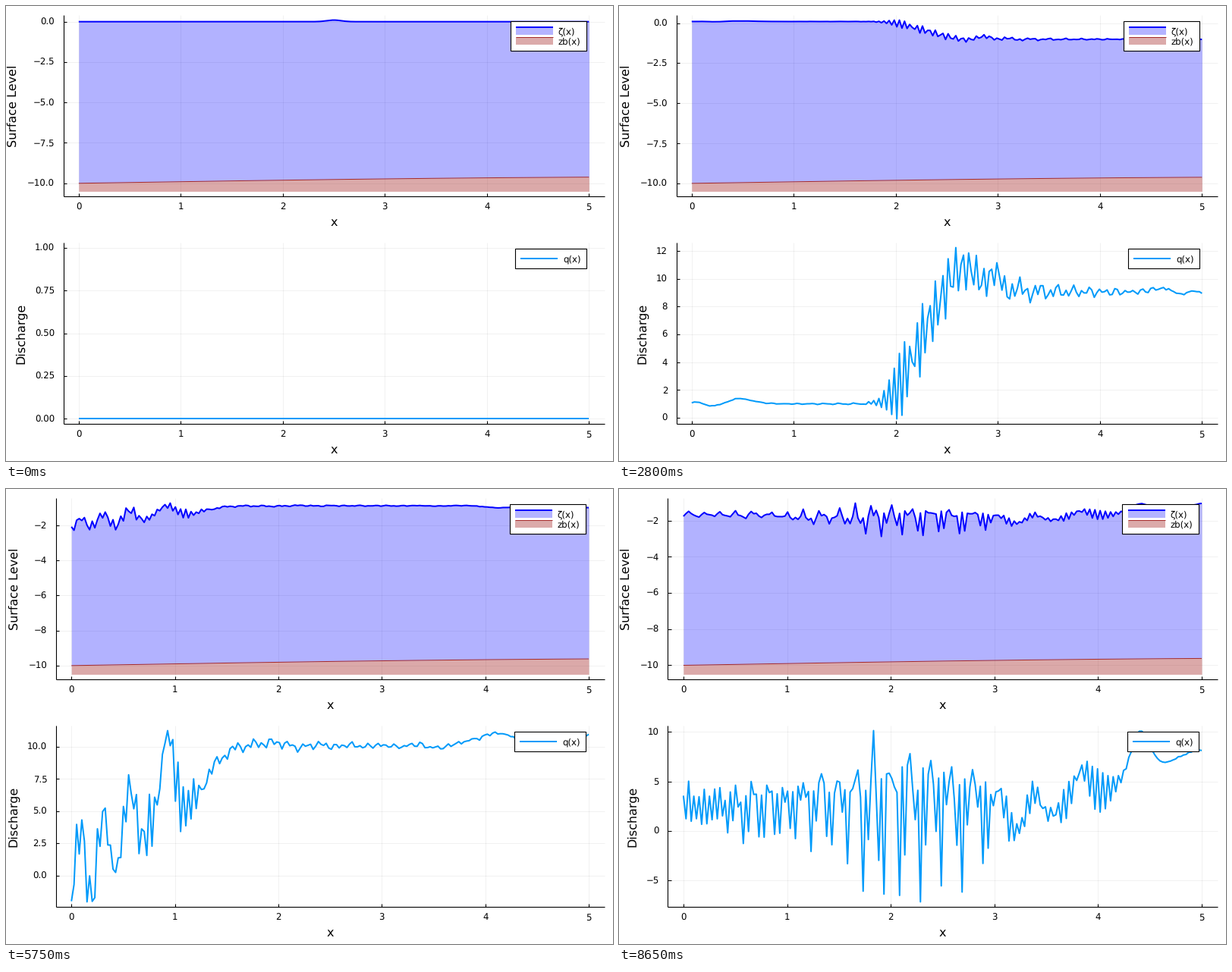
Recreate the animation shown at these times as a matplotlib script. Size 800 by 600 pixels, loop 8.7 s.

```python
import numpy as np
import matplotlib.pyplot as plt
from matplotlib.animation import FuncAnimation
from matplotlib.collections import LineCollection
from matplotlib.patches import Rectangle

plt.rcParams["font.family"] = "DejaVu Sans"
plt.rcParams["text.hinting"] = "none"

FRAMES, SUBSTEPS = 174, 6
N, LENGTH, G, CF = 200, 5.0, 9.81, 0.0025
Q_IN, Z_OUT, LAG = 1.0, -1.0, 0.0018
X = np.linspace(0, LENGTH, N)
DX = X[1] - X[0]
BED = -10 + 0.4 * np.sin(X / 4)
FLOOR = -10.5

BLUE, BROWN, SKY = "#0000ff", "#a52a2a", "#009afa"
BLUE_FILL, BROWN_FILL = "#b3b3ff", "#dbaaaa"
RIGHT = 788.5
TOPS, HEIGHT = (11.8, 311.8), 239.4
TICK_PX, LABEL_PX = 11.8, 16


# --- shallow water flow on a collocated grid ---------------------------

def ddx(a, left, right):
    p = np.concatenate(([left], a, [right]))
    return (p[2:] - p[:-2]) / (2 * DX)


def rates(z, q, q_out):
    h = z - BED
    dz = -ddx(q, Q_IN, q_out)
    flux = ddx(q * q / h, Q_IN ** 2 / h[0], q_out ** 2 / (Z_OUT - BED[-1]))
    dq = -flux - G * h * ddx(z, z[0], Z_OUT) - CF * q * np.abs(q) / h ** 2
    return np.array([dz, dq])


def damp(a, scale):
    """Weak filter that only bites on very large grid-scale wiggles."""
    d = np.zeros(N)
    d[2:-2] = (a[:-4] - 4 * a[1:-3] + 6 * a[2:-2] - 4 * a[3:-1] + a[4:]) / 16
    return a - d * np.minimum(0.25, 1e-4 + 6e-6 * (d * scale) ** 4)


def clock(i):
    """Model time: even steps that lengthen towards the end."""
    return 0.00559 * i + 1.68e-5 * max(0, i - 130) ** 2


def simulate():
    s = np.array([0.1 * np.exp(-100 * (X - 2.5) ** 2), np.zeros(N)])
    q_out = 0.0
    states = [s.copy()]
    for i in range(1, FRAMES):
        dt = (clock(i) - clock(i - 1)) / SUBSTEPS
        for _ in range(SUBSTEPS):
            k1 = rates(*s, q_out)
            k2 = rates(*(s + dt / 2 * k1), q_out)
            k3 = rates(*(s + dt / 2 * k2), q_out)
            k4 = rates(*(s + dt * k3), q_out)
            s = s + dt / 6 * (k1 + 2 * k2 + 2 * k3 + k4)
            s = np.array([np.clip(damp(s[0], 10), -3.2, 0.25),
                          np.clip(damp(s[1], 1), -9, 12.5)])
            q_out += (s[1][-1] - q_out) * dt / LAG
        states.append(s.copy())
    return states


STATES = simulate()


# --- axis helpers -------------------------------------------------------

def padded(lo, hi):
    if hi - lo < 1e-9:
        lo, hi = 0.0, 1.0
    pad = 0.03 * (hi - lo)
    return lo - pad, hi + pad


def ticks(lo, hi):
    """Pick 4 to 8 round tick values and return them with their labels."""
    best = None
    for e in range(-3, 2):
        for m, nice in ((1, 1), (5, 0.9), (2, 0.7), (2.5, 0.5), (3, 0.2)):
            step = m * 10.0 ** e
            a, b = int(np.ceil(lo / step)), int(np.floor(hi / step))
            n = b - a + 1
            if not 4 <= n <= 8:
                continue
            score = (0.25 * (1 - abs(n - 5) / 5) + 0.25 * nice
                     + 0.5 * (hi - lo) / ((n - 1) * step)
                     + (a <= 0 <= b) / 6)
            key = (round(score, 6), -n)
            if best is None or key > best[0]:
                best = key, step, a, b
    _, step, a, b = best
    digits = next(d for d in range(5) if abs(round(step, d) - step) < 1e-9)
    values = [k * step for k in range(a, b + 1)]
    return values, [f"{v:.{digits}f}".replace("-", "\u2212") for v in values]


def text_width(label):
    em = {"\u2212": 0.838, ".": 0.318}
    return TICK_PX * sum(em.get(c, 0.636) for c in label)


# --- drawing in pixel coordinates ----------------------------------------

fig = plt.figure(figsize=(8, 6), dpi=100, facecolor="white")
ax = fig.add_axes([0, 0, 1, 1])


def text(x, y, s, px=TICK_PX, ha="left", rotation=0):
    ax.text(x, y, s, fontsize=px * 0.72, ha=ha, va="baseline", color="black",
            rotation=rotation, rotation_mode="anchor", zorder=6)


def line(x, y, color, px, z=4):
    ax.plot(x, y, color=color, lw=px * 0.72, zorder=z,
            solid_capstyle="butt", solid_joinstyle="round")


def segments(segs, px, z, **kw):
    ax.add_collection(LineCollection(segs, linewidths=px * 0.72, zorder=z, **kw))


def box(x0, y0, x1, y1, fill, edge="none", z=5):
    ax.add_patch(Rectangle((x0, y0), x1 - x0, y1 - y0, facecolor=fill,
                           edgecolor=edge, lw=0.8, zorder=z))


def draw_axes(top, left, px, py, values, labels, title):
    bottom = top + HEIGHT
    xs, ys = [px(k) for k in range(6)], [py(v) for v in values]
    segments([[(x, top), (x, bottom)] for x in xs]
             + [[(left, y), (RIGHT, y)] for y in ys], 0.8, 1,
             colors="black", alpha=0.07)
    segments([[(left, top), (left, bottom)], [(left, bottom), (RIGHT, bottom)]]
             + [[(x, bottom), (x, bottom - 4.5)] for x in xs]
             + [[(left, y), (left + 4.5, y)] for y in ys], 1.1, 3,
             colors="black")
    for k, x in enumerate(xs):
        text(x, bottom + 17.3, str(k), ha="center")
    for y, s in zip(ys, labels):
        text(left - 11.5, y + 4.3, s, ha="right")
    widest = max(map(text_width, labels))
    text((left + RIGHT) / 2, bottom + 39, "x", LABEL_PX, "center")
    text(left - widest - 25.3, top + HEIGHT / 2, title, LABEL_PX, "center", 90)


def draw_legends(shift):
    right = 764.5 - shift / 3
    box(664.8 - shift, 20, right, 58.5, "white", "black")
    x0, x1 = 672.3 - shift, 720.5 - shift / 2
    box(x0, 27.7, x1, 38.3, BLUE_FILL)
    line([x0, x1], [27.7, 27.7], BLUE, 2, 6)
    box(x0, 40.5, x1, 51, BROWN_FILL)
    line([x0, x1], [40.5, 40.5], BROWN, 1, 6)
    text(727 - shift / 3, 37.3, "\u03b6(x)")
    text(727 - shift / 3, 50.2, "zb(x)")
    box(671 - shift, 320, right, 345.8, "white", "black")
    line([678.3 - shift, 727.3 - shift], [333, 333], SKY, 2, 6)
    text(734 - shift / 2, 337.3, "q(x)")


def update(i):
    ax.clear()
    ax.set_axis_off()
    ax.set_xlim(0, 800)
    ax.set_ylim(600, 0)
    ax.set_autoscale_on(False)

    z, q = STATES[i]
    limits = padded(FLOOR, z.max()), padded(q.min(), q.max())
    marks = [ticks(*lim) for lim in limits]
    left = 39.5 + max(text_width(s) for _, labels in marks for s in labels)

    def px(x):
        return left + (RIGHT - left) * (x / LENGTH + 0.03) / 1.06

    def scale(top, lim):
        return lambda v: top + HEIGHT * (lim[1] - v) / (lim[1] - lim[0])

    y_level, y_flow = (scale(t, lim) for t, lim in zip(TOPS, limits))
    for y, mark, top, title in zip((y_level, y_flow), marks, TOPS,
                                   ("Surface Level", "Discharge")):
        draw_axes(top, left, px, y, *mark, title)

    xs = px(X)
    ax.fill_between(xs, y_level(BED), y_level(z), color=BLUE, alpha=0.3,
                    lw=0, zorder=2)
    ax.fill_between(xs, y_level(BED), y_level(FLOOR), color=BROWN, alpha=0.4,
                    lw=0, zorder=2)
    line(xs, y_level(z), BLUE, 2)
    line(xs, y_level(BED), BROWN, 1)
    line(xs, y_flow(q), SKY, 2)
    draw_legends(0.12 * (75.6 - left))
    return []


anim = FuncAnimation(fig, update, frames=FRAMES, interval=50,
                     repeat=True, repeat_delay=0, blit=False)
plt.show()
```
